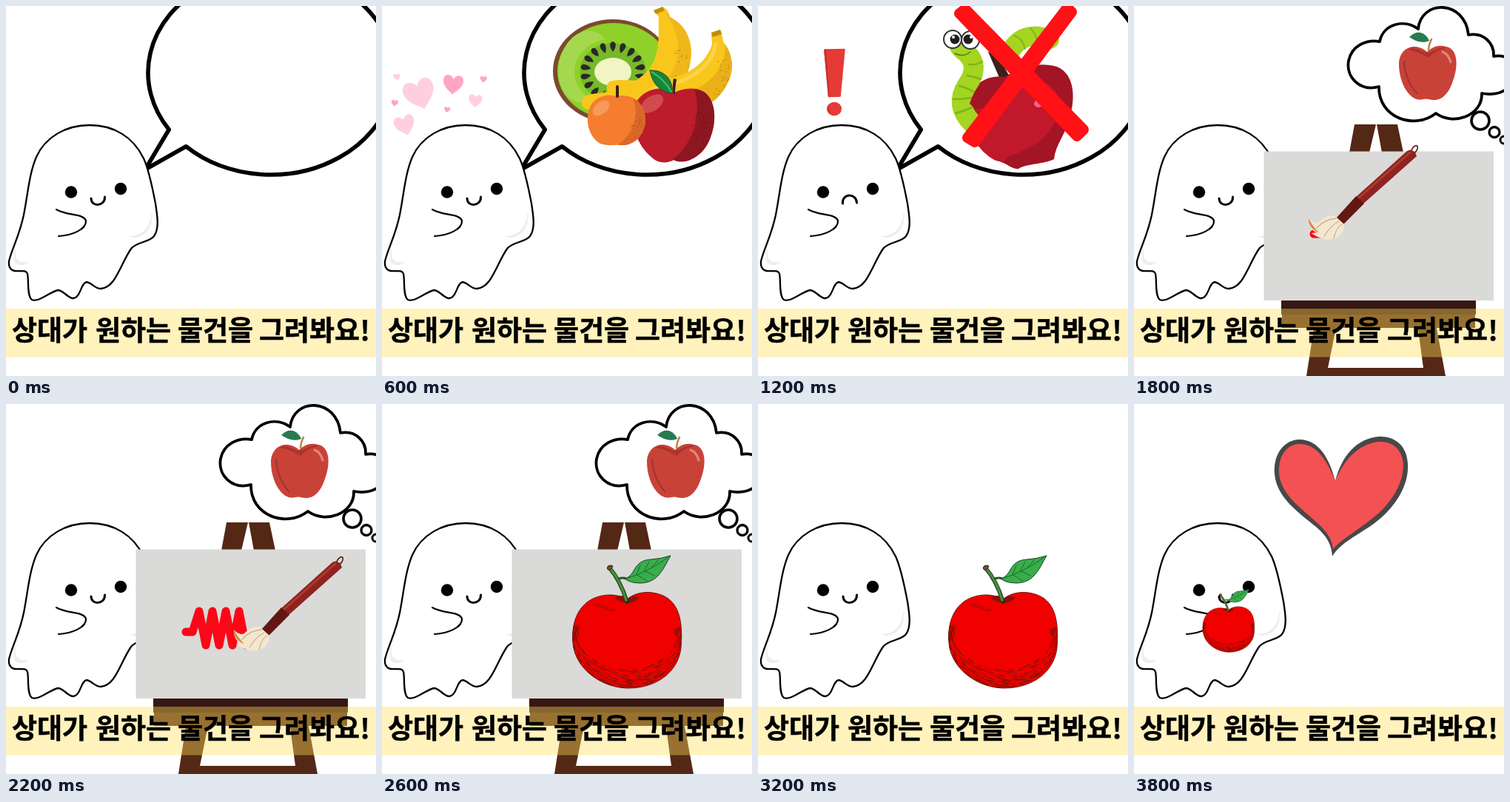
Recreate the animation shown at these times as an HTML page with a canvas. Size 500 by 500 pixels, loop 4.8 s.

```html
<!DOCTYPE html>
<html lang="ko">
<head>
<meta charset="utf-8">
<style>
  html, body { margin: 0; width: 100%; height: 100%; overflow: hidden; background: #fff; }
  canvas { display: block; width: 500px; height: 500px; }
</style>
</head>
<body>
<canvas id="stage" width="500" height="500"></canvas>
<script>
const ctx = document.getElementById('stage').getContext('2d');
const TAU = Math.PI * 2;
const LOOP = 4800;

function shape(d, fill, stroke, width = 2) {
  const path = new Path2D(d);
  if (fill) { ctx.fillStyle = fill; ctx.fill(path); }
  if (stroke) { ctx.strokeStyle = stroke; ctx.lineWidth = width; ctx.stroke(path); }
}

function oval(x, y, rx, ry, fill, stroke, width = 2, turn = 0) {
  ctx.beginPath();
  ctx.ellipse(x, y, rx, ry, turn, 0, TAU);
  if (fill) { ctx.fillStyle = fill; ctx.fill(); }
  if (stroke) { ctx.strokeStyle = stroke; ctx.lineWidth = width; ctx.stroke(); }
}

function box(x, y, w, h, fill) {
  ctx.fillStyle = fill;
  ctx.fillRect(x, y, w, h);
}

function placed(x, y, scale, turn, draw) {
  ctx.save();
  ctx.translate(x, y);
  ctx.rotate(turn);
  ctx.scale(scale, scale);
  draw();
  ctx.restore();
}

function clipped(d, draw) {
  ctx.save();
  ctx.clip(new Path2D(d));
  draw();
  ctx.restore();
}

function seeded(seed) {
  return () => (seed = (seed * 16807) % 2147483647) / 2147483647;
}

function speckle(seed, count, x, y, rx, ry, color) {
  const rand = seeded(seed);
  for (let i = 0; i < count; i++) {
    const a = rand() * TAU, r = Math.sqrt(rand());
    oval(x + Math.cos(a) * r * rx, y + Math.sin(a) * r * ry, 0.8, 0.8, color);
  }
}

function ghost(mouth) {
  shape('M113 161C81 161 53 177 41 204C31 227 29 258 24 282C19 307 10 324 5 341C2 350 5 357 12 358' +
    'C20 359 27 356 29 362C31 370 28 392 35 397C44 401 60 386 70 384C78 384 83 395 91 395' +
    'C101 394 101 374 109 373C116 374 120 382 128 382C148 381 154 350 169 328' +
    'C177 318 193 320 200 311C207 301 205 286 202 267C198 246 193 221 186 206C172 177 146 161 113 161Z',
    '#fff', '#000', 2.3);
  shape('M197 281C195 299 187 309 168 312C184 315 198 303 197 281Z', '#eee', '#eee', 1);
  shape('M14 325C10 342 17 348 30 346C27 352 13 352 11 344C10 337 11 330 14 325Z', '#eee');
  shape('M68 275C84 284 104 280 108 290C109 302 89 310 71 311', null, '#000', 2.2);
  oval(88, 251.5, 8.2, 8.2, '#000');
  oval(155, 247, 8.2, 8.2, '#000');
  shape(mouth === 'sad' ? 'M114.5 267C113 253 133 252 133.5 266' : 'M115 260C115 272 134 271 133.5 258',
    null, '#000', 3);
}

function speechBubble() {
  const rad = Math.PI / 180;
  ctx.beginPath();
  ctx.ellipse(358, 90, 166, 138, 0, 146.1 * rad, 493.7 * rad);
  ctx.lineTo(188, 221);
  ctx.closePath();
  ctx.fillStyle = '#fff';
  ctx.fill();
  ctx.strokeStyle = '#000';
  ctx.lineWidth = 5.6;
  ctx.stroke();
}

function kiwi() {
  oval(312, 88, 81, 70, '#7b4a30');
  oval(313, 88, 76, 65, '#8fd129');
  oval(275, 82, 36, 49, '#a5d84f', null, 0, 0.2);
  oval(312, 89, 52, 45, '#8fd129');
  oval(312, 89, 45, 39, '#77b929');
  oval(312, 89, 25, 19, '#f1f4c4');
  for (let i = 0; i < 18; i++) {
    const a = i / 18 * TAU - TAU / 4;
    placed(312 + 37 * Math.cos(a), 89 + 34 * Math.sin(a), 1, a, () =>
      shape('M-7 0C-2 -4 6 -6 7 0C6 6 -2 4 -7 0Z', '#29282a'));
  }
}

function bananas() {
  const back = 'M367 6L379 1Q386 3 389 15C414 27 424 55 414 87C402 119 354 145 305 143' +
    'C286 143 270 140 270 132C269 124 276 119 292 118C330 113 361 95 369 70C376 50 373 30 374 15Z';
  const front = 'M445 36L457 32Q460 38 461 48C480 72 476 102 451 126C421 151 365 149 322 130' +
    'C304 122 299 108 308 102C320 97 345 103 370 100C408 97 436 82 446 52Z';
  shape(back, '#f9c71c');
  clipped(back, () => {
    shape('M384 10C409 49 407 86 366 118L310 146L420 146L440 20Z', '#efb719');
    speckle(7, 18, 402, 82, 12, 30, '#b9810f');
  });
  shape('M367 6L379 1L382 6L370 11Z', '#c18b16');
  shape(front, '#f9c71c');
  clipped(front, () => {
    shape('M464 50C466 95 423 128 352 128L365 150L480 144L485 65Z', '#e9b018');
    shape('M451 52C445 84 412 105 365 112', null, '#fbd34a', 5);
    speckle(19, 25, 458, 99, 14, 31, '#b47c10');
  });
  shape('M445 36L457 32L459 38L447 42Z', '#c08b16');
}

function fruitBowl() {
  kiwi();
  bananas();
  const apple = 'M395 117C380 106 351 112 342 133C333 157 345 189 365 205C374 213 385 213 394 208' +
    'C410 216 434 203 443 180C454 153 450 126 435 116C422 109 407 111 395 117Z';
  shape(apple, '#bd1c2d');
  clipped(apple, () => {
    shape('M421 108C435 151 417 190 390 210L420 222L460 180L455 105Z', '#8d1721');
    oval(365, 132, 17, 10, '#cf4b4d', null, 0, -0.6);
    speckle(31, 28, 432, 165, 14, 36, '#5f0e18');
  });
  shape('M394 119C392 111 393 104 394 98L398 99C397 107 396 112 396 119Z', '#35231d');
  shape('M362 87C381 86 394 99 392 118C374 116 365 103 362 87Z', '#16853c', '#174b29', 1);
  shape('M364 89Q381 98 391 116', null, '#4db85c', 2);
  const orange = 'M317 122C302 117 285 124 280 139C274 158 281 178 295 186C306 190 317 187 323 188' +
    'C341 189 354 175 356 156C357 134 340 117 317 122Z';
  shape(orange, '#f47d30');
  clipped(orange, () => {
    shape('M336 118C350 143 342 174 315 190L365 190L365 125Z', '#da6928');
    oval(296, 138, 13, 8, '#f79a59', null, 0, -0.7);
    speckle(43, 18, 345, 161, 8, 20, '#a94b1c');
  });
  shape('M318 122L318 109', null, '#36231b', 4);
}

function heart(x, y, size, turn, color) {
  placed(x, y, size, turn, () =>
    shape('M0 -.26C-.12 -.56 -.52 -.52 -.5 -.16C-.48 .16 -.15 .34 0 .5C.15 .34 .48 .16 .5 -.16C.52 -.52 .12 -.56 0 -.26Z', color));
}

function loveHearts() {
  const pale = '#ffcfe0', pink = '#ffa4c5';
  heart(51, 119, 42, -0.32, pale);
  heart(96, 106, 27, 0.08, pink);
  heart(31, 161, 28, -0.3, pale);
  heart(126, 128, 18, 0.12, pale);
  heart(20, 96, 9, -0.2, pale);
  heart(137, 99, 9, 0.1, pink);
  heart(17, 131, 9, 0.2, pink);
  heart(88, 140, 8, 0.2, pink);
}

function exclamation() {
  shape('M90 59L117 58.5L111 122L95.5 122.5Z', '#e63a37', '#e63a37', 1.5);
  shape('M89 59L92 59L97 122L95 123Z', '#c93230');
  oval(103, 139, 10, 9.3, '#e63a37');
  shape('M96 133Q91 140 99 147Q95 140 96 133Z', '#c93230');
}

function wormyApple() {
  shape('M340 63C352 42 370 35 394 45', null, '#a4d521', 26);
  shape('M346 40Q358 44 361 58M368 30Q377 38 377 50', null, '#82b51c', 2);
  shape('M311 62L322 64L344 102L331 108Z', '#3d2017');
  const apple = 'M333 96C312 92 285 105 281 137C279 166 298 198 322 209C338 212 340 220 352 220' +
    'C362 213 386 214 400 207C402 188 415 174 419 157C430 128 429 92 404 82C378 74 352 84 333 96Z';
  shape(apple, '#a31425');
  clipped(apple, () => {
    shape('M270 148C310 140 330 108 366 102C398 98 414 122 404 150C395 178 370 192 340 203L318 222L260 210Z', '#c1182c');
    oval(379, 132, 6, 5, '#ef668f');
  });
  shape('M275 58C297 73 294 91 283 106C270 126 274 143 291 160', null, '#a4d521', 27);
  shape('M285 79Q296 80 303 75M283 94Q294 96 301 99M272 108Q284 111 291 116M264 126Q276 126 288 124M267 145Q278 142 289 137',
    null, '#7fb41b', 2.5);
  shape('M286 132Q293 106 316 112L312 136Q296 143 286 132Z', '#a31425');
  oval(275, 55, 16, 14, '#a4d521');
  for (const x of [263, 287]) {
    oval(x, x === 263 ? 45 : 46, 12, 12, '#fff', '#333', 2);
    oval(x + (x === 263 ? 3 : -3), 45, 6.5, 6.5, '#211d20');
    oval(x + 1, 42, 2, 2, '#fff');
  }
  shape('M266 64Q277 70 287 62', null, '#527d14', 1.5);
  shape('M272 10L280 4L440 167L431 176Z', '#ff1116', '#ff1116', 14);
  shape('M418 2L424 8L293 184L283 178Z', '#ff1116', '#ff1116', 14);
}

function thoughtCloud() {
  shape('M332 48C337 24 365 17 384 31C388 -9 447 -9 452 39C472 35 487 50 486 68C507 64 520 82 513 99' +
    'C505 118 487 121 470 118C471 149 431 162 408 145C379 168 330 151 331 109' +
    'C305 116 286 96 290 74C294 54 313 45 332 48Z', '#fff', '#000', 3.8);
  oval(468, 155, 12, 12, '#fff', '#000', 3.6);
  oval(487, 170.5, 7, 7, '#fff', '#000', 3.3);
  oval(500, 181, 5, 5, '#fff', '#000', 3);
  shape('M396 62C382 49 359 54 358 78C358 101 369 122 382 126C389 128 394 124 398 126C415 131 425 118 430 104C439 82 438 58 422 55C411 52 404 55 396 62Z', '#c94238');
  shape('M370 59C381 53 386 63 397 63C407 62 411 53 422 57Q410 58 398 70Q383 61 370 59Z', '#aa332c');
  shape('M365 75Q366 99 382 118', null, '#a7352f', 2.5);
  shape('M417 62Q425 65 428 76', null, '#e38778', 3);
  shape('M398 59Q399 50 402 45', null, '#b88946', 2.5);
  shape('M372 42C383 31 394 36 399 47C389 51 381 48 372 42Z', '#287b50');
}

function easel() {
  const wood = '#532815';
  shape('M298 160L327 160L318 198L291 198Z', wood);
  shape('M328 160L356 160L364 198L335 198Z', wood);
  shape('M244 430L274 430L262 489L391 489L383 430L408 430L421 500L233 500Z', wood);
  box(200, 417, 261, 18, wood);
  box(199, 397, 263, 20, '#371713');
  box(175.5, 196.5, 310.5, 201.5, '#dadad9');
}

function paintStroke(steps) {
  ctx.beginPath();
  ctx.moveTo(243, 308);
  let tip = [243, 308];
  for (let i = 1; i <= steps; i++) {
    tip = [243 + i * 9, i === 1 ? 308 : i % 2 ? 326 : 280];
    ctx.lineTo(...tip);
  }
  ctx.strokeStyle = '#fb0717';
  ctx.lineWidth = 11;
  ctx.stroke();
  return tip;
}

function brush(dx, dy) {
  placed(dx, dy, 1, 0, () => {
    oval(379, 194, 3.2, 6, null, '#572019', 1.7, 0.6);
    shape('M300 258L369 196Q374 192 380 198L382 203L309 268Z', '#8e2420');
    shape('M303 260L373 198', null, '#ad3b2c', 3);
    shape('M272 288L300 257L311 267L282 296Z', '#621811');
    shape('M272 284C263 281 255 287 250 292C244 295 239 290 236 287C235 296 240 304 247 306L240 307C250 315 270 320 279 309C284 304 283 298 284 295Z', '#f4e7d0');
    shape('M236 287C235 297 243 304 250 306C244 300 240 295 236 287Z', '#d28a45');
    shape('M273 287Q257 288 247 300M277 291Q266 296 257 311M281 295Q273 299 270 314', null, '#cbb28d', 1.3);
  });
}

const APPLE = 'M331 264C315 254 291 257 277 268C259 282 255 308 259 330C266 362 300 384 333 384' +
  'C370 384 400 363 404 330C407 293 402 263 371 256C355 252 340 256 331 264Z';

function paintedApple() {
  shape(APPLE, '#f10000', '#5c1206', 0.9);
  clipped(APPLE, () => {
    const rand = seeded(77);
    ctx.strokeStyle = '#7d1505';
    ctx.lineWidth = 0.7;
    ctx.beginPath();
    for (let i = 0; i < 480; i++) {
      const a = -0.3 + rand() * 3.7;
      const depth = 0.12 + 0.25 * Math.max(0, Math.sin(a));
      const r = 1 - rand() ** 1.5 * depth;
      const x = 331 + 74 * r * Math.cos(a), y = 319 + 65 * r * Math.sin(a);
      ctx.moveTo(x, y);
      ctx.lineTo(x - 5 * Math.sin(a) - 1, y + 4 * Math.cos(a) - 1);
    }
    for (let i = 0; i < 9; i++) {
      ctx.moveTo(286 + i * 3, 272 + i);
      ctx.lineTo(292 + i * 3, 270 + i);
    }
    ctx.stroke();
  });
  shape('M314 262Q325 255 331 264Q338 256 348 262Q338 271 331 268Q322 269 314 262Z', '#8c1109');
  shape('M307 221Q322 238 331 267', null, '#172f18', 5.5);
  shape('M308 222Q322 238 330 265', null, '#478e38', 3.5);
  oval(308, 221, 4, 2.5, '#75502d', '#242414', 1, -0.6);
  shape('M320 236Q326 234 330 236', null, '#245b29', 3);
  shape('M328 236C344 232 338 211 364 210Q378 209 390 205C380 222 374 241 350 242C340 242 333 240 328 236Z', '#39ad4b', '#173e20', 1);
  shape('M329 236Q356 229 387 207M344 231L349 218M354 227L361 213M364 221L374 210M345 231L358 239M356 226L368 232', null, '#18622b', 0.9);
}

function bigHeart() {
  shape('M272 104C264 73 249 47 222 48C199 50 188 72 190 95C193 127 223 147 246 166C260 178 267 189 268 206' +
    'C277 190 297 180 318 166C350 145 372 112 370 81C369 55 351 43 331 44C300 47 281 70 272 104Z', '#484848');
  shape('M272 104C261 77 247 53 222 54C203 56 195 74 196 94C199 124 228 142 248 161C260 172 267 181 269 196' +
    'C279 184 297 174 315 160C345 139 364 110 364 82C363 61 349 50 331 51C303 54 284 75 272 104Z', '#f45153');
}

function talking(mouth) {
  speechBubble();
  ghost(mouth);
}

function painting(steps) {
  ghost();
  thoughtCloud();
  easel();
  const [x, y] = paintStroke(steps);
  brush(x - 252, y - 308);
}

const scenes = [
  [0, () => talking()],
  [600, () => { talking(); fruitBowl(); loveHearts(); }],
  [1200, () => { talking('sad'); wormyApple(); exclamation(); }],
  [1800, () => painting(1)],
  [2000, () => painting(5)],
  [2200, () => painting(9)],
  [2400, () => painting(12)],
  [2600, () => { ghost(); thoughtCloud(); easel(); paintedApple(); }],
  [3200, () => { ghost(); paintedApple(); }],
  [3800, () => {
    ghost();
    placed(-29.5, 153, 0.475, 0, paintedApple);
    bigHeart();
  }]
];

function caption() {
  box(0, 409, 500, 65.5, 'rgba(255, 222, 89, 0.4)');
  ctx.font = '700 37px "Noto Sans CJK KR", "Noto Sans CJK", "Noto Sans CJK JP", sans-serif';
  ctx.fillStyle = ctx.strokeStyle = '#000';
  ctx.lineWidth = 0.5;
  [['상대가', 8], ['원하는', 121], ['물건을', 232], ['그려봐요!', 342]].forEach(([word, x]) => {
    ctx.fillText(word, x, 452);
    ctx.strokeText(word, x, 452);
  });
}

function render(now) {
  const time = now % LOOP;
  box(0, 0, 500, 500, '#fff');
  ctx.lineJoin = 'round';
  ctx.lineCap = 'round';
  scenes.findLast(([start]) => time >= start)[1]();
  caption();
}

const began = performance.now();
function tick() {
  render(performance.now() - began);
  requestAnimationFrame(tick);
}
tick();
</script>
</body>
</html>
```
